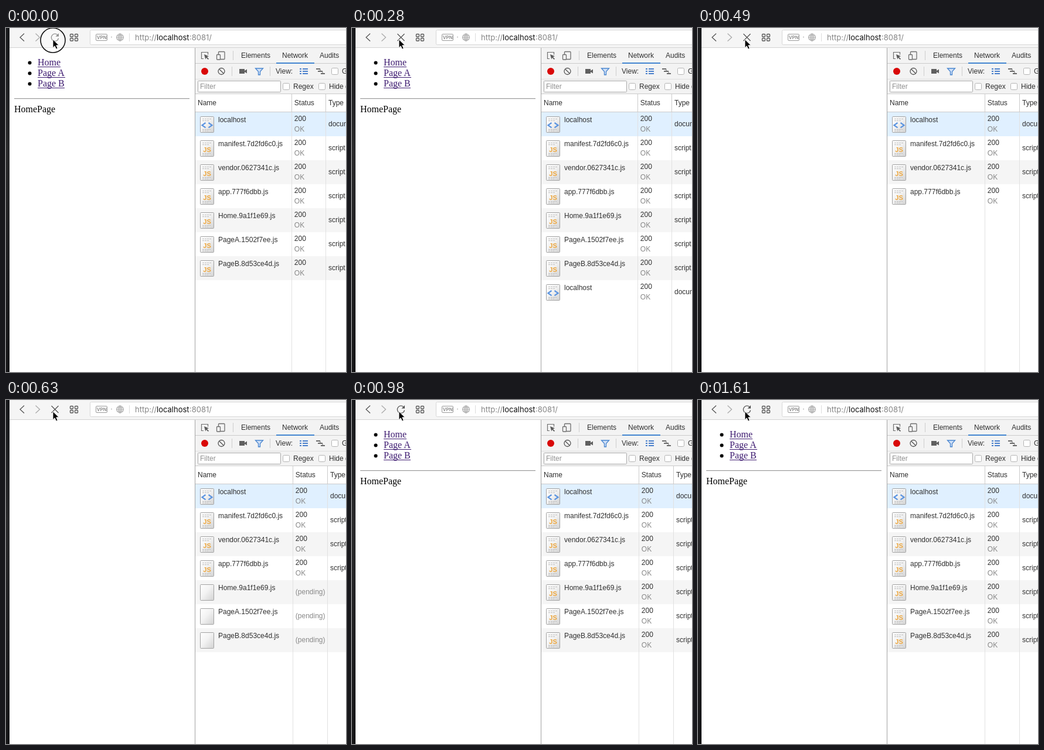
An HTML page for the animation above (1680 ms loop, 580 px wide and 588 px high).

```html
<!DOCTYPE html>
<html lang="en">
<head>
<meta charset="utf-8">
<title>Reloading a page</title>
<style>
  html, body { margin: 0; width: 100%; height: 100%; overflow: hidden; background: #fff; }
  svg { display: block; width: 100%; height: 100%; }
  text { font: 12px "Liberation Sans", Arial, sans-serif; fill: #303030; }
  .page text { font: 16px "Liberation Serif", Times, serif; fill: #000; }
  .page .link { fill: #3d1a70; }
  .url text { font: 13px Inter, sans-serif; fill: #858585; }
  .url .host { fill: #111; }
  .url .vpn { font-size: 8px; font-weight: 600; fill: #888; }
  .dim { fill: #888; }
  .line { fill: none; stroke: #555; stroke-width: 1.3; }
  .box { fill: #fff; stroke: #b4b4b4; }
  .mark { font-weight: bold; font-size: 11px; fill: #eda63c; text-anchor: middle; }
</style>
</head>
<body>
<svg viewBox="0 0 580 588">
  <defs>
    <linearGradient id="paper" x2="1" y2="1">
      <stop offset="0" stop-color="#fff"/><stop offset=".45" stop-color="#f3f3f3"/>
      <stop offset="1" stop-color="#d2d2d2"/>
    </linearGradient>
    <linearGradient id="edge" x2="0" y2="1">
      <stop offset="0" stop-color="#17181b"/><stop offset=".35" stop-color="#29292b"/>
      <stop offset="1" stop-color="#151517"/>
    </linearGradient>
    <g id="blank">
      <rect x="331.5" y="-13.5" width="23" height="27" rx="1" fill="url(#paper)" stroke="#a2a2a2"/>
    </g>
    <g id="sheet">
      <use href="#blank"/>
      <path d="M335 -9.5h15M335 -6.5h12M335 8.5h14M335 11h10" stroke="#b9b9b9" stroke-dasharray="3 1" fill="none"/>
    </g>
    <g id="script"><use href="#sheet"/><text class="mark" x="343" y="6">JS</text></g>
    <g id="document">
      <use href="#sheet"/>
      <path d="M340.5 -3l-6 4.2 6 4.2M345.5 -3l6 4.2-6 4.2" fill="none" stroke="#5b94e0" stroke-width="2.2"/>
    </g>
  </defs>

  <rect width="580" height="588" fill="#fff"/>

  <g class="page" id="page">
    <circle cx="40.5" cy="59.5" r="3"/><circle cx="40.5" cy="77.5" r="3"/><circle cx="40.5" cy="95.5" r="3"/>
    <text class="link" x="54" y="64">Home</text>
    <text class="link" x="54" y="82">Page A</text>
    <text class="link" x="54" y="100">Page B</text>
    <path d="M54 66.5h39M54 84.5h47M54 102.5h46" stroke="#3d1a70"/>
    <path d="M14 120.5h299" stroke="#9a9a9a"/><path d="M14 121.5h299" stroke="#ececec"/>
    <text x="14" y="144">HomePage</text>
  </g>

  <rect x="6" width="574" height="33" fill="#f5f5f5"/>
  <path d="M6 33.5h574" stroke="#d2d2d2"/>
  <rect x="143.5" y="3.5" width="450" height="25" rx="2" fill="#fff" stroke="#d6d6d6"/>
  <path class="line" d="M31 9.5l-7 6.5 7 6.5"/>
  <path class="line" d="M50.5 9.5l7 6.5-7 6.5" style="stroke:#aaa"/>
  <g class="line">
    <rect x="109.5" y="10.5" width="5" height="4.5" rx="1"/><rect x="117.5" y="10.5" width="5" height="4.5" rx="1"/>
    <rect x="109.5" y="17.5" width="5" height="4.5" rx="1"/><rect x="117.5" y="17.5" width="5" height="4.5" rx="1"/>
  </g>
  <g class="url">
    <rect x="153.5" y="10.5" width="19" height="11" rx="1.5" fill="none" stroke="#999"/>
    <text class="vpn" x="154.8" y="19">VPN</text>
    <circle cx="180" cy="15.5" r="1" fill="#bbb"/>
    <path d="M188.5 16a6 6 0 1 0 12 0a6 6 0 1 0 -12 0h12M194.5 10v12M191.7 16a2.8 6 0 1 0 5.6 0a2.8 6 0 1 0 -5.6 0M189.5 13h10M189.5 19h10" fill="none" stroke="#999" stroke-width=".9"/>
    <path d="M210.5 9v14" stroke="#ddd"/>
    <text x="220" y="21">http://</text><text class="host" x="257" y="21">localhost</text><text x="313" y="21">:8081/</text>
  </g>
  <path id="stop" class="line" d="M77.5 10l12 12M89.5 10l-12 12"/>
  <g id="reload">
    <path class="line" d="M88.4 12.3a6.2 6.2 0 1 0 1.2 5.2"/>
    <path d="M90 9v5.5h-5.5z" fill="#555"/>
  </g>

  <rect x="323" y="34" width="257" height="79" fill="#f3f3f3"/>
  <path d="M323 60.5h257M323 112.5h257" stroke="#cbcbcb"/>
  <path d="M323 87.5h257" stroke="#dedede"/>
  <path d="M461 60h65" stroke="#4285d0" stroke-width="2"/>
  <path d="M387.5 39v16M385.5 66v16M450.5 66v16" stroke="#ccc"/>
  <path d="M337 52.5h-3.500v-11h11v4" fill="none" stroke="#6e6e6e" stroke-width="1.2"/>
  <path d="M338 45l8 3.3-3.2 1.3 3.2 3.2-1.2 1.2-3.200-3.200-1.3 2.700z" fill="#5a5a5a"/>
  <g fill="#f3f3f3" stroke="#6e6e6e" stroke-width="1.3">
    <rect x="362.500" y="40.500" width="10.500" height="13" rx="1"/>
    <rect x="359.500" y="45.500" width="6" height="8.500" rx="1"/>
  </g>
  <text x="401" y="51" fill="#555">Elements</text>
  <text x="471" y="51">Network</text>
  <text x="535" y="51">Audits</text>

  <circle cx="339" cy="74" r="6" fill="#d90808"/>
  <path class="line" d="M362 74a5.500 5.500 0 1 0 11 0a5.500 5.500 0 1 0 -11 0M363.700 70.200l7.600 7.600"/>
  <path d="M398 70h9v3l4-2.500v7l-4-2.500v3h-9z" fill="#606060"/>
  <path d="M425.500 69h13l-5 5.500v5.500h-3v-5.500z" fill="#cfe0f7" stroke="#4a86cf" stroke-width="1.3"/>
  <text x="460" y="78">View:</text>
  <path d="M501 70h3m2 0h9M501 74h3m2 0h9M501 78h3m2 0h9" stroke="#4a80cc" stroke-width="2.200"/>
  <path d="M529 70h7M532 74h8M537 78h7" stroke="#6a6a6a" stroke-width="1.800"/>
  <path d="M536 70.500v3M540 74.500v3" stroke="#6a6a6a"/>
  <rect class="box" x="555.500" y="68.500" width="11" height="11" rx="2"/>
  <text x="573" y="78">Group by frame</text>

  <rect x="327.500" y="90.500" width="141" height="19" rx="1" fill="#fff" stroke="#a8a8a8"/>
  <text x="331" y="104" style="fill:#909090">Filter</text>
  <rect class="box" x="472.500" y="94.500" width="11" height="11" rx="2"/>
  <text x="490" y="104">Regex</text>
  <rect class="box" x="533.500" y="94.500" width="11" height="11" rx="2"/>
  <text x="551" y="104">Hide data URLs</text>

  <text x="327" y="132">Name</text>
  <g id="table"></g>
  <path d="M322.500 34v554" stroke="#a3a3a3"/>
  <rect width="6" height="588" fill="url(#edge)"/>

  <circle id="click" cx="80" cy="21" r="21" fill="#fff" fill-opacity=".35" stroke="#111" stroke-width="1.600"/>
  <path d="M80 19.500v14.200l3.200-3 2.300 5.300 2.600-1.100-2.300-5.200h4.500z" fill="#000" stroke="#fff" stroke-width=".9"/>
</svg>

<script>
const LOOP = 1680;
const FILES = ["localhost", "manifest.7d2fd6c0.js", "vendor.0627341c.js", "app.777f6dbb.js",
  "Home.9a1f1e69.js", "PageA.1502f7ee.js", "PageB.8d53ce4d.js", "localhost"];

// rows: visible requests, loaded: how many of them are complete
const STEPS = [
  { at: 0,   rows: 7, loaded: 7, page: true,  busy: false, click: true },
  { at: 140, rows: 7, loaded: 7, page: true,  busy: true },
  { at: 210, rows: 8, loaded: 8, page: true,  busy: true },
  { at: 350, rows: 4, loaded: 1, page: true,  busy: true,  wide: true },
  { at: 420, rows: 4, loaded: 4, page: true,  busy: true,  wide: true },
  { at: 490, rows: 4, loaded: 4, page: false, busy: true,  wide: true },
  { at: 630, rows: 7, loaded: 4, page: false, busy: true,  wide: true },
  { at: 700, rows: 7, loaded: 7, page: false, busy: true,  wide: true },
  { at: 770, rows: 7, loaded: 7, page: true,  busy: true,  wide: true },
  { at: 840, rows: 7, loaded: 7, page: true,  busy: false, wide: true }
];

const el = id => document.getElementById(id);
const show = (id, on) => { el(id).style.display = on ? "" : "none"; };
const label = (x, y, text, cls = "") => `<text x="${x}" y="${y}" class="${cls}">${text}</text>`;

function row(name, i, done, statusX, typeX) {
  const mid = 164 + 41 * i;
  const kind = name === "localhost" ? "document" : "script";
  const fill = i === 0 ? "#e0f0ff" : i % 2 ? "#fff" : "#f5f5f5";
  const status = done
    ? label(statusX, mid - 5, "200") + label(statusX, mid + 13, "OK", "dim") + label(typeX, mid + 4, kind)
    : label(statusX, mid + 4, "(pending)", "dim");
  return `<rect x="323" y="${mid - 20}" width="257" height="41" fill="${fill}"/>
    <use href="#${done ? kind : "blank"}" y="${mid + 1}"/>${label(362, mid - 3, name)}${status}`;
}

function table({ rows, loaded, wide }) {
  const first = wide ? 489.5 : 487.5;
  const second = wide ? 548.5 : 545.5;
  const statusX = first + 4.3, typeX = second + 4.5;
  return FILES.slice(0, rows).map((name, i) => row(name, i, i < loaded, statusX, typeX)).join("")
    + label(statusX, 132, "Status") + label(typeX, 132, "Type")
    + `<path d="M${first} 143V588M${second} 143V588" stroke="#e1e1e1"/>
       <path d="M${first} 113v30M${second} 113v30M323 143.5h257" stroke="#cbcbcb"/>`;
}

let current;
function draw() {
  const time = performance.now() % LOOP;
  const step = STEPS.findLast(s => s.at <= time);
  if (step !== current) {
    current = step;
    el("table").innerHTML = table(step);
    show("page", step.page);
    show("stop", step.busy);
    show("reload", !step.busy);
    show("click", step.click);
  }
  requestAnimationFrame(draw);
}
draw();
</script>
</body>
</html>
```
